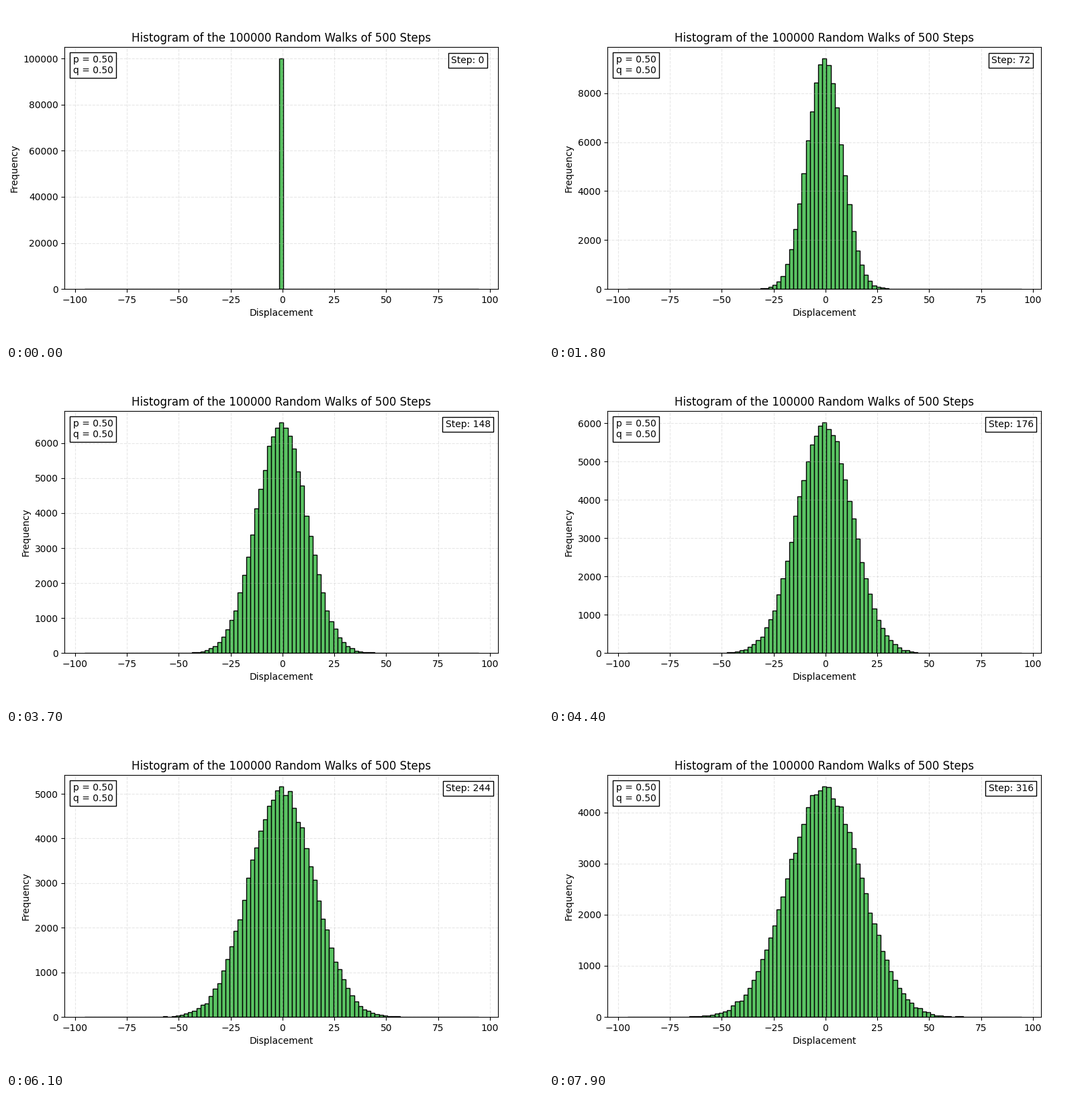
These frames come from a looping animation (800x500 px, 8000 ms). A matplotlib script:

```python
import numpy as np
import matplotlib.pyplot as plt
from matplotlib.animation import FuncAnimation

WALKS, TOTAL, STRIDE, FRAMES = 100000, 500, 4, 80
P = 0.5
EDGES = np.arange(-95.5, 95.5, 2)


def simulate():
    """Histogram counts of all walks, one row per frame."""
    rng = np.random.default_rng(7)
    pos = np.zeros(WALKS, dtype=int)
    rows = [np.histogram(pos, EDGES)[0]]
    for _ in range(FRAMES - 1):
        pos += 2 * rng.binomial(STRIDE, P, WALKS) - STRIDE
        rows.append(np.histogram(pos, EDGES)[0])
    return rows


plt.rcParams["font.family"] = "DejaVu Sans"
counts = simulate()

fig = plt.figure(figsize=(8, 5), dpi=100, facecolor="white")
ax = fig.add_axes([87.36 / 800, 78.9 / 500, 646 / 800, 360 / 500])
bars = ax.bar(EDGES[:-1], counts[0], width=2, align="edge",
              color="#5ac463", edgecolor="black", linewidth=1)
ax.set_xlim(-105, 104)
ax.set_title(f"Histogram of the {WALKS} Random Walks of {TOTAL} Steps")
ax.set_xlabel("Displacement")
ax.set_ylabel("Frequency")
ax.grid(True, linestyle="--", alpha=0.3)


def boxed(x, y, text, ha):
    return ax.text(x, y, text, transform=ax.transAxes, ha=ha, va="center",
                   bbox=dict(boxstyle="square,pad=0.3", facecolor="white",
                             edgecolor="black"))


boxed(0.0188, 0.925, f"p = {P:.2f}\nq = {1 - P:.2f}", "left")
label = boxed(0.93, 0.945, "", "center")


def update(i):
    for bar, n in zip(bars, counts[i]):
        bar.set_height(n)
    ax.set_ylim(0, 1.05 * counts[i].max())
    label.set_text(f"Step: {i * STRIDE}")
    return [*bars, label]


anim = FuncAnimation(fig, update, frames=FRAMES, init_func=lambda: update(0),
                     interval=100, repeat=True, repeat_delay=0, blit=False)
plt.show()
```
